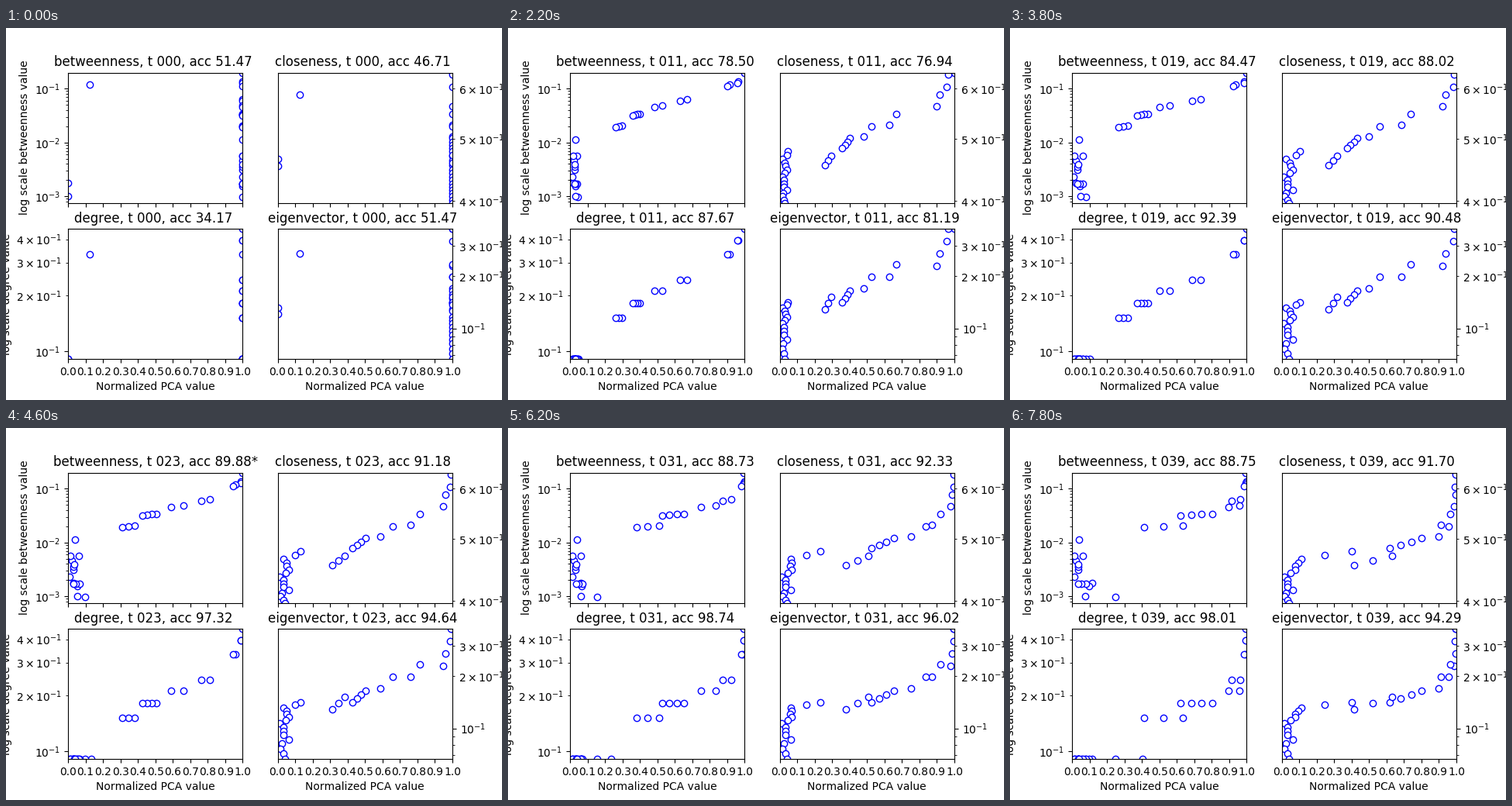
A matplotlib script that plays this animation: 640 by 480 pixels, repeating every 8000 ms.

```python
import numpy as np
import matplotlib.pyplot as plt
from matplotlib.animation import FuncAnimation

plt.rcParams["text.kerning_factor"] = 6

STEPS = 40
SETTLED = 7        # step at which the nodes have found their order
LEAVES = 16        # nodes of the lowest degree
rng = np.random.default_rng(4)

# Hubs and middle nodes: a typical value per degree, spread within each group
GROUPS = {15: 1, 13: 2, 11: 2, 8: 2, 7: 2, 6: 4, 5: 3}
hub_degree = np.repeat(list(GROUPS), list(GROUPS.values()))
rank = np.concatenate([np.linspace(1, -1, n) * (n > 1) for n in GROUPS.values()])

POINTS = [5, 6, 8, 11, 13, 15]
hub_between = np.interp(hub_degree, POINTS, [.02, .033, .061, .115, .132, .198])
hub_between *= 1 + .04 * rank
hub_distance = np.interp(hub_degree, POINTS, [71.3, 67, 61.5, 57.5, 53.5, 52])
hub_distance -= 1.2 * rank
hub_eigen = np.interp(hub_degree, POINTS, [.14, .153, .216, .25, .347, .375])
hub_eigen *= 1 + .08 * rank

# Leaves: smooth trends from the best connected to the worst
leaf = np.arange(LEAVES)
leaf_between = .0009 * 1.14 ** leaf * np.exp(rng.normal(0, .25, LEAVES))
leaf_between = np.maximum(leaf_between, .00076)
leaf_between[0] = np.nan           # on no shortest path, so off the log scale
leaf_distance = 69 + 14 * leaf / (LEAVES - 1)
leaf_eigen = .1416 - .005 * leaf
leaf_base = rng.uniform(0, .065, LEAVES)

degree = np.append(hub_degree, np.full(LEAVES, 3))
distance = np.append(hub_distance, leaf_distance)

start = np.ones(len(degree))
start[3] = .125
start[[len(rank) + 2, len(rank) + 4]] = 0

# Typical position by degree at a few steps
LEVEL_STEPS = [7, 15, 28, 39]
LEVELS = {
    5: [.315, .24, .414, .523],
    6: [.418, .341, .544, .711],
    7: [.574, .435, .743, .927],
    8: [.663, .636, .882, .938],
    11: [.905, .908, .98, .99],
    13: [.94, .98, .995, .995],
    15: [1, 1, .995, .995],
}

ACC_STEPS = [0, 7, 15, 23, 28, 35, 39]
# name: values, limits, accuracy at the steps above, steps marked with a star
PANELS = {
    "betweenness": (np.append(hub_between, leaf_between), (.00076, .198),
                    [51.47, 77.94, 79.07, 89.88, 88.84, 88.58, 88.75], {23}),
    "closeness": (33 / distance, (33 / 83, 33 / 52),
                  [46.71, 69.03, 84.86, 91.18, 91.44, 93.51, 91.70], {35}),
    "degree": (degree / 33, (3 / 33, 15 / 33),
               [34.17, 87.89, 87.46, 97.32, 98.70, 98.79, 98.01], {28, 35}),
    "eigenvector": (np.append(hub_eigen, leaf_eigen), (.0666, .375),
                    [51.47, 76.04, 86.33, 94.64, 96.54, 95.33, 94.29], {28}),
}


def settled_positions(step):
    growth = (step / (STEPS - 1)) ** 3
    level = np.array([np.interp(step, LEVEL_STEPS, LEVELS[d]) for d in hub_degree])
    hubs = level + rank * (.02 + .09 * growth) * 4 * level * (1 - level)
    spread = np.clip((step - SETTLED) / 8, 0, 1)
    leaves = .018 + (leaf_base - .018) * spread + .34 * .55 ** leaf * growth
    return np.append(hubs, leaves)


def positions(step):
    left = max(0, 1 - step / SETTLED) ** 3
    return settled_positions(max(step, SETTLED)) * (1 - left) + start * left


fig, axes = plt.subplots(2, 2, figsize=(6.4, 4.8), dpi=100)
dots = []
for i, (ax, (name, panel)) in enumerate(zip(axes.flat, PANELS.items())):
    values, limits = panel[:2]
    ax.set_yscale("log")
    line, = ax.plot(start, values, "bo", mfc="white")
    dots.append(line)
    ax.set_xlim(0, 1)
    ax.set_ylim(*limits)
    ax.set_xticks(np.arange(11) / 10)
    if i < 2:
        ax.tick_params(labelbottom=False)
    else:
        ax.set_xlabel("Normalized PCA value")
    if i % 2:
        ax.yaxis.tick_right()
    else:
        ax.set_ylabel(f"log scale {name} value")


def draw(step):
    xs = positions(step)
    for ax, line, (name, panel) in zip(axes.flat, dots, PANELS.items()):
        accuracy, stars = panel[2:]
        acc = np.interp(step, ACC_STEPS, accuracy)
        mark = "*" if step in stars else " "
        line.set_xdata(xs)
        ax.set_title(f"{name}, t {step:03d}, acc {acc:.2f}{mark}")
    return dots


anim = FuncAnimation(fig, draw, frames=STEPS, interval=200, repeat=True,
                     repeat_delay=0, blit=False)
plt.show()
```
